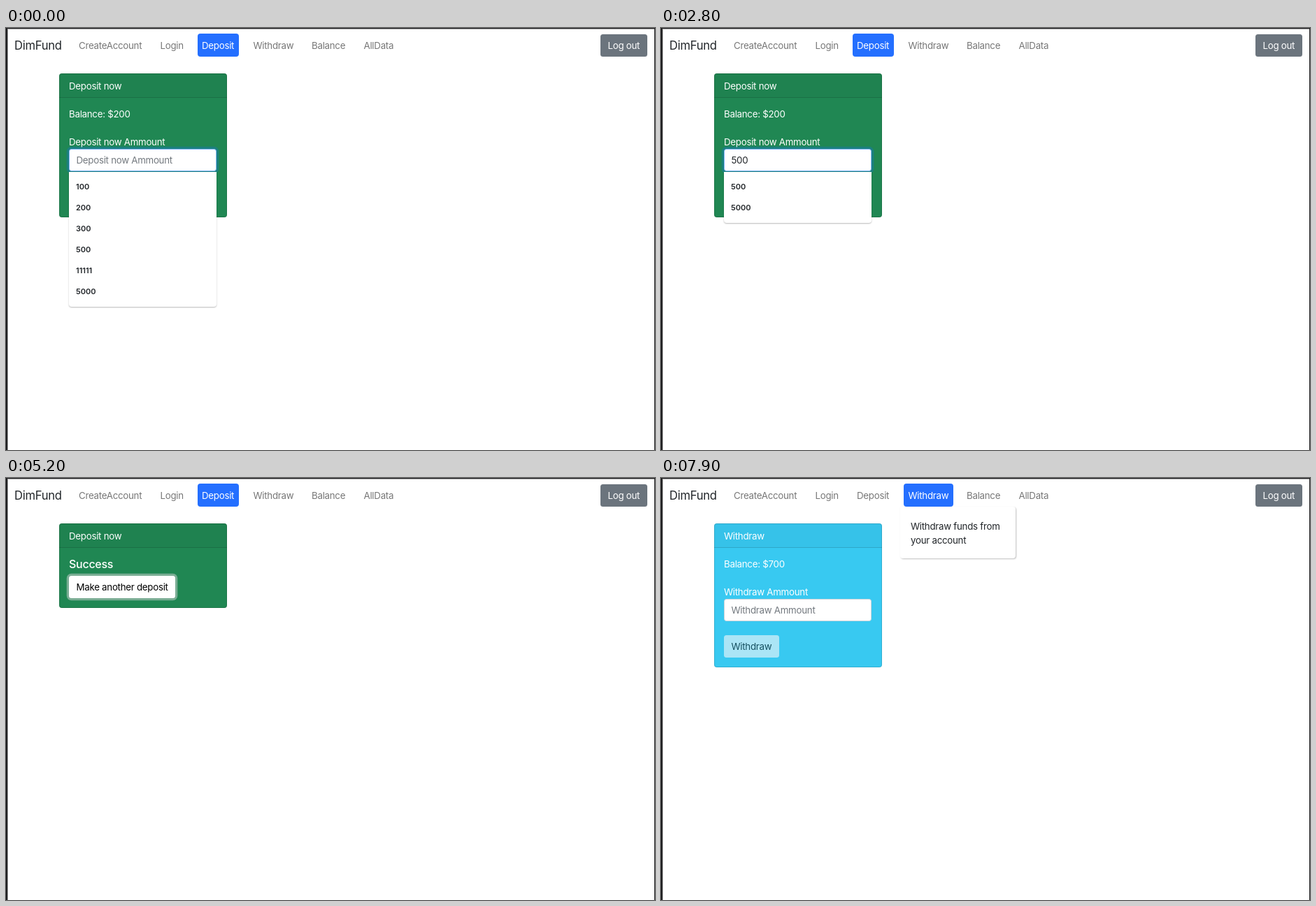
Write an HTML page that moves like this. It is 928x604 px and loops after 8 s.

```html
<!DOCTYPE html>
<html lang="en">
<head>
<meta charset="utf-8">
<title>Deposit and withdraw</title>
<style>
  html, body { margin: 0; width: 100%; height: 100%; overflow: hidden; background: #fff; }
  #stage {
    position: relative; width: 928px; height: 604px; overflow: hidden; box-sizing: border-box;
    border: solid #1d1d1f; border-width: 1px 1px 0 2px; box-shadow: inset 1px 1px 0 #aaa;
    font: 13.3px/20px Inter, "Open Sans", sans-serif; letter-spacing: -.27px;
    color: #212529; white-space: nowrap;
  }
  #page { position: absolute; left: -2px; top: -1px; }
  #page * { position: absolute; box-sizing: border-box; }
  #page [hidden] { display: none; }

  .brand { left: 12px; top: 15px; font-size: 16.6px; }
  .link { top: 8px; height: 33px; padding: 6.5px; border-radius: 4px; }
  .logout { left: 850px; top: 9px; width: 67px; color: #fff; background: #6b747d; }
  .btn { height: 32px; padding: 6px 10.5px; border-radius: 3.5px; }

  .card {
    left: 76px; top: 65px; width: 239.6px; height: 205.6px; border-radius: 4px; color: #fff;
    background: var(--fill); box-shadow: inset 0 0 0 1px rgba(0, 0, 0, .13);
  }
  .card.short { height: 120.6px; }
  .head {
    left: 0; top: 0; width: 100%; height: 35px; padding: 7.5px 14px;
    background: rgba(0, 0, 0, .03); border-bottom: 1px solid rgba(0, 0, 0, .14);
    border-radius: 4px 4px 0 0;
  }
  .balance { left: 14px; top: 48px; }
  .label { left: 14px; top: 88px; }
  .field {
    left: 14px; top: 108px; width: 211px; height: 32px; padding: 5px 9.5px;
    background: #fff; color: #212529; border: 1px solid #ced4da; border-radius: 3.5px;
  }
  .field .hint { color: #73797f; }
  .caret { top: 7px; width: 1px; height: 15px; background: #212529; }
  .card .btn { left: 14px; top: 159.5px; background: #f8f9fa; color: #000; }
  .card .btn.off { opacity: .6; }
  .title { left: 14px; top: 48px; font-size: 16px; font-weight: 500; }
  .card .again { top: 75px; width: 152px; background: #fff; }

  .menu {
    left: 90px; top: 206px; width: 211px; background: #fff; border-radius: 0 0 4px 4px;
    box-shadow: 0 1px 2px rgba(0, 0, 0, .28);
    font-size: 11px; font-weight: 600; letter-spacing: 0;
  }
  .menu span { left: 10px; }
  .tip {
    left: 342px; top: 41px; width: 165px; height: 74px; padding: 18px 15px;
    background: #fff; border-radius: 0 4px 4px 4px; box-shadow: 1px 1px 2px rgba(0, 0, 0, .25);
  }
</style>
</head>
<body>
<div id="stage"><div id="page">
  <span class="brand">DimFund</span>
  <span class="link" style="left:97.5px;color:#777">CreateAccount</span>
  <span class="link" style="left:214px;color:#777">Login</span>
  <span class="link" id="navDeposit" style="left:273.5px">Deposit</span>
  <span class="link" id="navWithdraw" style="left:347px">Withdraw</span>
  <span class="link" style="left:430.5px;color:#777">Balance</span>
  <span class="link" style="left:505px;color:#777">AllData</span>
  <span class="btn logout">Log out</span>

  <div class="card" id="deposit" style="--fill:#208753">
    <div class="head">Deposit now</div>
    <div id="form">
      <span class="balance">Balance: $200</span>
      <span class="label">Deposit now Ammount</span>
      <div class="field" id="field"><span id="value"></span><i class="caret" id="caret"></i></div>
      <span class="btn" id="send">Deposit now</span>
    </div>
    <div id="done">
      <span class="title">Success</span>
      <span class="btn again" id="again">Make another deposit</span>
    </div>
  </div>

  <div class="card" id="withdraw" style="--fill:#38c9f1">
    <div class="head">Withdraw</div>
    <span class="balance">Balance: $700</span>
    <span class="label">Withdraw Ammount</span>
    <div class="field"><span class="hint">Withdraw Ammount</span></div>
    <span class="btn off">Withdraw</span>
  </div>

  <div class="menu" id="menu"></div>
  <div class="tip" id="tip">Withdraw funds from<br>your account</div>
</div></div>
<script>
  const LOOP = 8000, TICK = 100;
  const $ = id => document.getElementById(id);

  // Typed text, caret and suggestions from each time on
  const saved = [100, 200, 300, 500, 11111, 5000];
  const typing = [
    { at: 0, text: "", caret: false, list: saved },
    { at: 400, text: "", caret: true, list: saved },
    { at: 600, text: "1", caret: true, list: [100, 11111] },
    { at: 1100, text: "1", caret: false, list: [100, 11111] },
    { at: 1500, text: "", caret: false, list: [] },
    { at: 1600, text: "", caret: true, list: [] },
    { at: 1900, text: "5", caret: true, list: [500, 5000, 55] },
    { at: 2100, text: "50", caret: true, list: [500, 5000] },
    { at: 2300, text: "500", caret: true, list: [500, 5000] },
    { at: 2800, text: "500", caret: false, list: [500, 5000] },
    { at: 3100, text: "500", caret: false, list: [] }
  ];
  const BLUR = 3100, SENT = 3800, SWITCH = 5300;

  const ramp = (t, from, length) => Math.min(1, Math.max(0, (t - from) / length));
  const mix = (a, b, p) => `rgb(${a.map((v, i) => Math.round(v + (b[i] - v) * p))})`;

  function paintLink(link, active) {
    link.style.background = `rgba(36,111,255,${active})`;
    link.style.color = mix([119, 119, 119], [255, 255, 255], active);
  }

  function paintForm(t) {
    const step = typing.filter(s => s.at <= t).pop();
    const focus = 1 - ramp(t, BLUR - 100, 150);
    $("value").textContent = step.text || "Deposit now Ammount";
    $("value").className = step.text ? "" : "hint";
    $("caret").hidden = !step.caret;
    $("caret").style.left = 10 + (step.text ? $("value").offsetWidth - 1 : 0) + "px";
    $("field").style.borderColor = mix([206, 212, 218], [134, 183, 254], focus);
    $("field").style.boxShadow = `0 0 0 3.3px rgba(13,110,253,${.25 * focus})`;
    $("send").classList.toggle("off", !step.text);
    $("menu").hidden = !step.list.length;
    $("menu").style.height = step.list.length * 30 + 13 + "px";
    $("menu").innerHTML = step.list.map((n, i) => `<span style="top:${11 + i * 30}px">${n}</span>`).join("");
  }

  function paint(t) {
    const sent = t >= SENT, switched = t >= SWITCH;
    const ring = ramp(t, SENT - 50, 150);
    $("deposit").hidden = switched;
    $("withdraw").hidden = $("tip").hidden = !switched;
    $("deposit").classList.toggle("short", sent);
    $("form").hidden = sent;
    $("done").hidden = !sent;
    $("again").style.boxShadow = `0 0 0 ${3.3 * ring}px rgba(211,212,213,.5)`;
    paintLink($("navDeposit"), 1 - ramp(t, SWITCH - 25, 125));
    paintLink($("navWithdraw"), ramp(t, SWITCH - 40, 140));
    $("navDeposit").style.borderRadius = switched ? 0 : "";
    paintForm(t);
  }

  let start, shown;
  function frame(now) {
    start ??= now;
    const t = Math.floor((now - start) % LOOP / TICK) * TICK;
    if (t !== shown) paint(shown = t);
    requestAnimationFrame(frame);
  }
  paint(0);
  requestAnimationFrame(frame);
</script>
</body>
</html>
```
